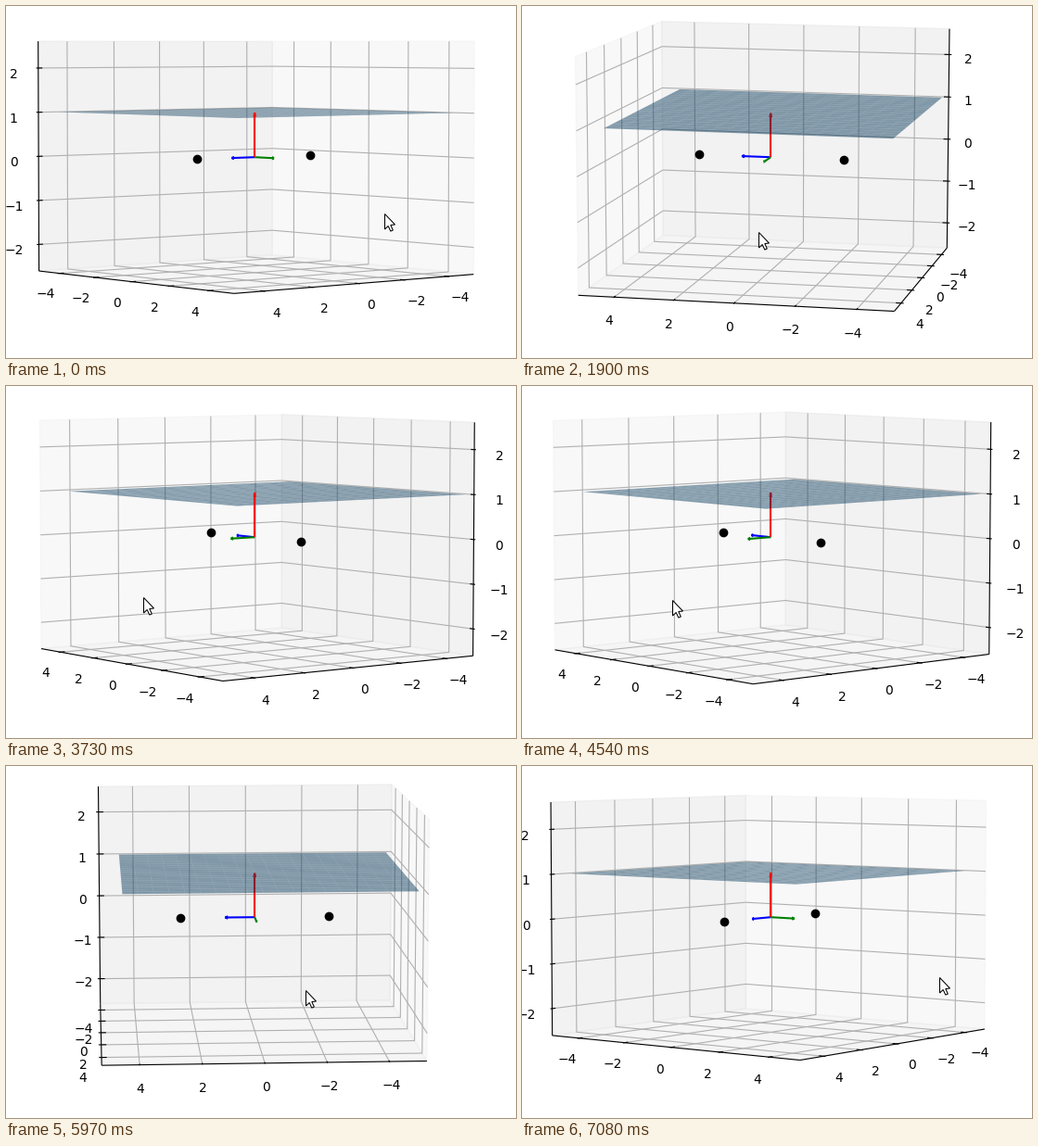
Animation, 550 px wide and 380 px high, one loop 7160 ms. Source, as a matplotlib script:

```python
import matplotlib.pyplot as plt
import numpy as np
from matplotlib.animation import FuncAnimation
from matplotlib.collections import LineCollection, PolyCollection

W, H = 550, 380
TICKS, INTERVAL = 179, 40      # 7160 ms loop
STEPS = 90                     # poses shown in one loop

CENTER = np.array([268.2, 163.2])
UNIT = np.array([32, 32, 48])  # pixels per data unit at the centre
DEPTH = 2800                   # camera distance in pixels
XY, Z = 5.208, 2.604           # half sizes of the box
PAD, ZPAD = 0.6, 0.3           # tick label offsets
DEG_PER_PX = 0.347

# step, azimuth, elevation of the dragged view
VIEW = np.array([
    (0, 50, 2.5), (1, 52.5, 3), (10, 65, 5.7), (14, 76, 5.8),
    (15, 79.6, 6.1), (19, 90.5, 6.8), (28, 113, 11.4), (33, 126.9, 12),
    (37, 137, 11.8), (42, 141, 8.5), (47, 142.7, 4.5), (49, 143, 4.4),
    (54, 143, 4.4), (58, 138, 5.5), (62, 129.7, 6.9), (65, 119.7, 8),
    (66, 115.7, 8.9), (75, 86.4, 9), (76, 82, 9.2), (81, 60, 8.6),
    (85, 46, 6.8), (89, 37.9, 4.25),
])

XY_TICKS = range(-4, 5, 2)
Z_TICKS = range(-2, 3)


def view_at(step):
    return (np.interp(step, VIEW[:, 0], VIEW[:, 1]),
            np.interp(step, VIEW[:, 0], VIEW[:, 2]))


def make_projector(azim, elev):
    a, e = np.radians([azim, elev])
    ca, sa, ce, se = np.cos(a), np.sin(a), np.cos(e), np.sin(e)
    basis = np.array([(-sa, ca, 0),
                      (-ca * se, -sa * se, ce),
                      (ca * ce, sa * ce, se)])

    def project(points):
        q = (np.asarray(points, float) * UNIT) @ basis.T
        scale = DEPTH / (DEPTH - q[..., 2:])
        return CENTER + q[..., :2] * (1, -1) * scale

    return project


def panes_for(x, y):
    """Corners of the back panes; x and y are the near sides."""
    return [
        [(-x, -XY, -Z), (-x, XY, -Z), (-x, XY, Z), (-x, -XY, Z)],
        [(-XY, -y, -Z), (XY, -y, -Z), (XY, -y, Z), (-XY, -y, Z)],
        [(-XY, -XY, -Z), (XY, -XY, -Z), (XY, XY, -Z), (-XY, XY, -Z)],
    ]


def grid_for(x, y):
    lines = [[(t, y, -Z), (t, -y, -Z), (t, -y, Z)] for t in XY_TICKS]
    lines += [[(x, t, -Z), (-x, t, -Z), (-x, t, Z)] for t in XY_TICKS]
    lines += [[(x, -y, t), (-x, -y, t), (-x, y, t)] for t in Z_TICKS]
    return lines


def axes_for(x, y):
    """Axis lines followed by their tick marks."""
    sx, sy = np.sign(x), np.sign(y)
    x_out, x_in = x + 0.085 * sx, x - 0.17 * sx
    y_out, y_in = y + 0.085 * sy, y - 0.17 * sy
    lines = [[(-XY, y, -Z), (XY, y, -Z)],
             [(x, -XY, -Z), (x, XY, -Z)],
             [(x, -y, -Z), (x, -y, Z)]]
    lines += [[(t, y_out, -Z), (t, y_in, -Z)] for t in XY_TICKS]
    lines += [[(x_out, t, -Z), (x_in, t, -Z)] for t in XY_TICKS]
    lines += [[(x_out, -y, t), (x_in, -y, t)] for t in Z_TICKS]
    return lines


def label_points(x, y):
    lx, ly = x + PAD * np.sign(x), y + PAD * np.sign(y)
    low = -Z - ZPAD
    return ([(t, ly, low) for t in XY_TICKS]
            + [(lx, t, low) for t in XY_TICKS]
            + [(lx, -ly, t) for t in Z_TICKS])


def arrow_lines(axis, side):
    """Unit arrow from the origin with a small two-line head."""
    u, w = np.eye(3)[axis], np.eye(3)[side]
    c, s = np.cos(np.radians(15)), np.sin(np.radians(15))
    return [[0 * u, u],
            [u, u + 0.1 * (-c * u + s * w)],
            [u, u + 0.1 * (-c * u - s * w)]]


ARROWS = np.array(arrow_lines(0, 2) + arrow_lines(1, 2) + arrow_lines(2, 0))
DOTS = np.array([(2.5, 0, 0), (-2.5, 0, 0)])
POINTER = np.array([(0, 0), (0, 16.5), (3.7, 13), (6.3, 18.6),
                    (8.8, 17.5), (6.3, 12), (11, 11.5)])

gx, gy = np.meshgrid(np.arange(-5, 5, 0.5), np.arange(-5, 5, 0.5))
SHEET = np.stack([gx, gy, np.ones_like(gx)], axis=-1)

fig = plt.figure(figsize=(W / 100, H / 100), dpi=100, facecolor="white")
ax = fig.add_axes([0, 0, 1, 1])
ax.set_xlim(0, W)
ax.set_ylim(H, 0)
ax.axis("off")

panes = [ax.add_patch(plt.Polygon([(0, 0)] * 4, facecolor=(g, g, g, 0.5),
                                  edgecolor=(g, g, g, 0.5), lw=1, zorder=1))
         for g in (0.95, 0.9, 0.925)]
grid = ax.add_collection(
    LineCollection([], colors="#b0b0b0", linewidths=0.8, zorder=2),
    autolim=False)
frame = ax.add_collection(
    LineCollection([], colors="black", linewidths=0.8, zorder=3),
    autolim=False)
labels = [ax.text(0, 0, str(t).replace("-", "\u2212"), fontsize=10,
                  family="DejaVu Sans", ha="center", va="top", zorder=3)
          for t in [*XY_TICKS, *XY_TICKS, *Z_TICKS]]
dots, = ax.plot([], [], "o", color="black", ms=6, zorder=4)
arrows = ax.add_collection(
    LineCollection([], colors=["b"] * 3 + ["g"] * 3 + ["r"] * 3,
                   linewidths=1.5, zorder=5), autolim=False)
sheet = ax.add_collection(
    PolyCollection([], facecolors=[(0.063, 0.247, 0.373, 0.5)],
                   edgecolors="none", linewidths=0, zorder=6), autolim=False)
pointer = ax.add_patch(plt.Polygon(POINTER, facecolor="white",
                                   edgecolor="black", lw=0.75, zorder=9))


def update(tick):
    step = int(tick * STEPS / TICKS + 0.45)
    azim, elev = view_at(step)
    project = make_projector(azim, elev)
    x = XY if azim < 90 else -XY
    y = XY

    for pane, corners in zip(panes, panes_for(x, y)):
        pane.set_xy(project(corners))
    grid.set_segments(list(project(grid_for(x, y))))
    frame.set_segments(list(project(axes_for(x, y))))
    for label, pos in zip(labels, project(label_points(x, y))):
        label.set_position(pos)

    dots.set_data(*project(DOTS).T)
    arrows.set_segments(list(project(ARROWS)))
    arrows.set_zorder(7 if elev < 5 else 5)
    p = project(SHEET)
    quads = np.stack([p[:-1, :-1], p[:-1, 1:], p[1:, 1:], p[1:, :-1]], axis=2)
    sheet.set_verts(quads.reshape(-1, 4, 2))

    # the view trails the pointer by one step
    lead_azim, lead_elev = view_at(step + 1)
    tip = (408.5 - (lead_azim - 52.5) / DEG_PER_PX,
           228.5 + (lead_elev - 4.4) / DEG_PER_PX)
    pointer.set_xy(POINTER + np.round(np.array(tip) - 0.5) + 0.5)
    return []


anim = FuncAnimation(fig, update, frames=TICKS, interval=INTERVAL,
                     init_func=lambda: update(0), repeat=True,
                     repeat_delay=0, blit=False)
plt.show()
```
